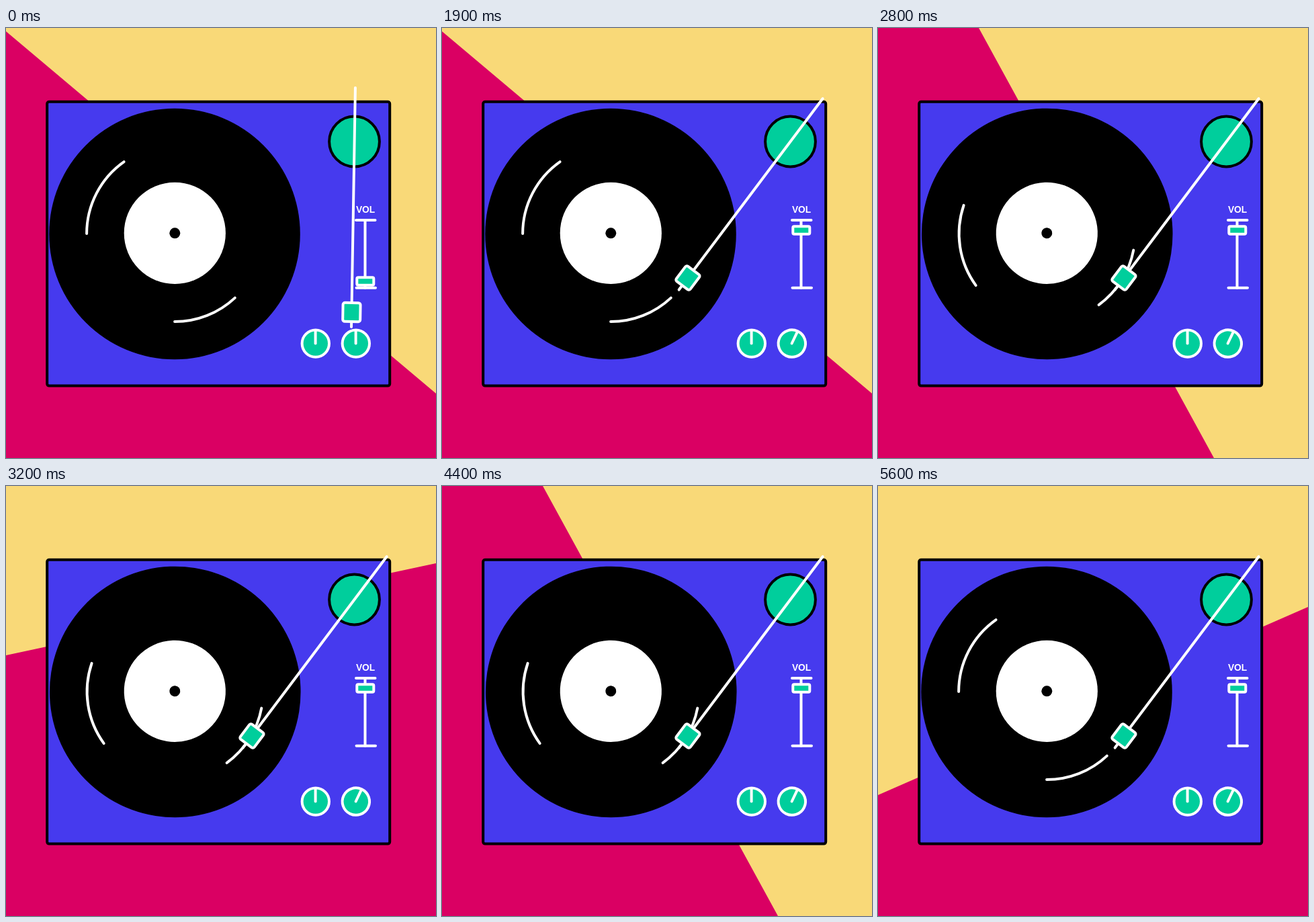
An HTML page with a canvas for the animation above (6 s loop, 640 by 640 pixels).

```html
<!DOCTYPE html>
<html lang="en">
<head>
<meta charset="utf-8">
<title>Turntable</title>
<style>
html, body { margin: 0; width: 100%; height: 100%; overflow: hidden; }
canvas { display: block; width: 100vw; height: 100vh; }
</style>
</head>
<body>
<canvas id="stage" width="640" height="640"></canvas>
<script>
const ctx = document.getElementById('stage').getContext('2d');
const LOOP = 6000, STEP = 100, BEAT = 400;
const YELLOW = '#f9d978', PINK = '#da0063', BLUE = '#463aee';
const GREEN = '#00ce9c', BLACK = '#000', WHITE = '#fff';
const rad = deg => deg * Math.PI / 180;

// Pink areas, one per beat
const backdrops = [
  [[0, 5], [640, 544], [640, 640], [0, 640]],
  [[0, 460], [640, 180], [640, 640], [0, 640]],
  [[0, 0], [150, 0], [500, 640], [0, 640]],
  [[0, 252], [640, 115], [640, 640], [0, 640]]
];

// Eased progress from 0 to 1 between two times
function ease(t, from, to) {
  const p = Math.min(1, Math.max(0, (t - from) / (to - from)));
  return (1 - Math.cos(Math.PI * p)) / 2;
}

function paint(fill, stroke) {
  if (fill) { ctx.fillStyle = fill; ctx.fill(); }
  if (stroke) { ctx.strokeStyle = stroke; ctx.stroke(); }
}

function circle(x, y, r, fill, stroke) {
  ctx.beginPath();
  ctx.arc(x, y, r, 0, 2 * Math.PI);
  paint(fill, stroke);
}

function box(cx, cy, w, h, r, fill, stroke) {
  ctx.beginPath();
  ctx.roundRect(cx - w / 2, cy - h / 2, w, h, r);
  paint(fill, stroke);
}

function line(x1, y1, x2, y2) {
  ctx.beginPath();
  ctx.moveTo(x1, y1);
  ctx.lineTo(x2, y2);
  paint(null, WHITE);
}

function arc(x, y, r, from, to) {
  ctx.beginPath();
  ctx.arc(x, y, r, rad(from), rad(to));
  paint(null, WHITE);
}

function turned(x, y, deg, draw) {
  ctx.save();
  ctx.translate(x, y);
  ctx.rotate(rad(deg));
  draw();
  ctx.restore();
}

function drawBackdrop(t) {
  const pose = t < 2400 ? 0 : Math.floor((t - 2000) / BEAT) % 4;
  ctx.fillStyle = YELLOW;
  ctx.fillRect(0, 0, 640, 640);
  ctx.beginPath();
  backdrops[pose].forEach(([x, y]) => ctx.lineTo(x, y));
  ctx.closePath();
  paint(PINK);
}

function drawRecord(t) {
  const scratching = t >= 1800 && t < 5500;
  const angle = scratching && t / STEP % 2 === 0 ? -36 : 0;
  turned(251.3, 305.3, angle, () => {
    circle(-0.3, 1.2, 186.8, BLACK);
    arc(-0.2, 0.8, 131, 180, 234.8);
    arc(-0.2, 0.8, 131, 46.8, 90);
    circle(0, 0, 75.6, WHITE);
    circle(0, 0, 8, BLACK);
  });
}

function drawVolume(t) {
  ctx.font = 'bold 13.8px "Liberation Sans", Arial, sans-serif';
  ctx.textAlign = 'center';
  ctx.fillStyle = WHITE;
  ctx.fillText('VOL', 535.1, 275.3);
  line(521, 286, 549.5, 286);
  line(521.5, 386.7, 550, 386.7);
  line(534.5, 286, 534.5, 386.7);
  box(534.8, 377 - 76 * ease(t, 700, 1200), 25, 11.5, 2, GREEN, WHITE);
}

function drawKnob(x, y, angle) {
  turned(x, y, angle, () => {
    circle(0, 0, 20.2, GREEN, WHITE);
    line(-0.2, 0, -0.2, -18.5);
  });
}

function drawArm(t) {
  turned(518.6, 169, 0.95 + 36 * ease(t, 0, 400), () => {
    line(0, -80, 0, 276);
    box(0, 254, 26, 28, 3, GREEN, WHITE);
  });
}

function draw(t) {
  ctx.lineWidth = 4;
  ctx.lineCap = 'round';
  drawBackdrop(t);
  box(316.2, 321.2, 510, 422.8, 3, BLUE, BLACK);
  drawRecord(t);
  circle(518.5, 169, 37.4, GREEN, BLACK);
  drawVolume(t);
  drawKnob(460.8, 469.6, 0);
  drawKnob(520.8, 469.6, 25.5 * ease(t, 1300, 1700));
  drawArm(t);
}

const start = performance.now();
function tick() {
  const t = (performance.now() - start) % LOOP;
  draw(Math.floor(t / STEP) * STEP);
  requestAnimationFrame(tick);
}
tick();
</script>
</body>
</html>
```
